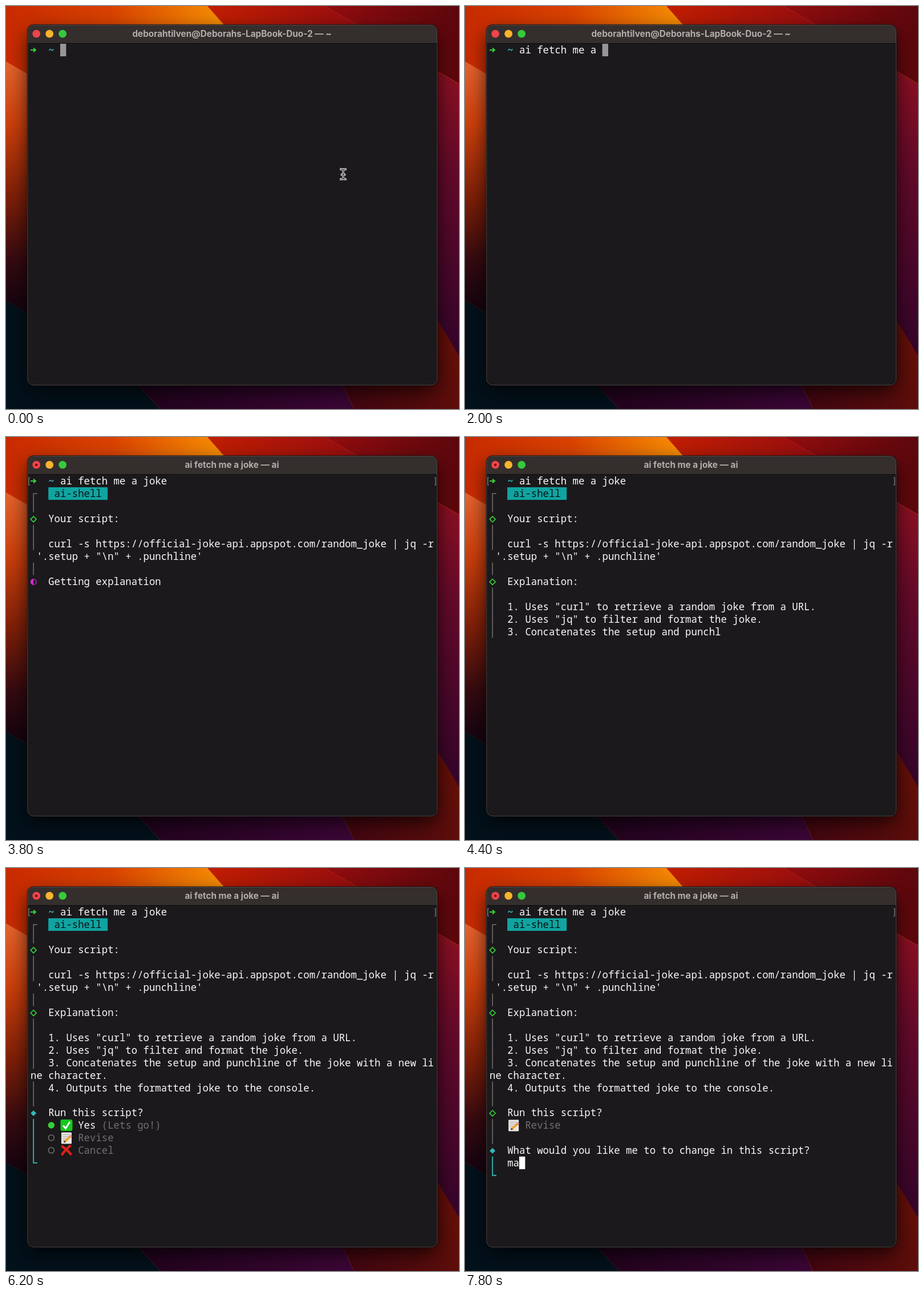
These frames come from a looping animation (794x705 px, 8000 ms). An HTML page:

```html
<!DOCTYPE html>
<html lang="en">
<head>
<meta charset="utf-8">
<title>Terminal session</title>
<style>
  html, body { margin: 0; width: 100%; height: 100%; overflow: hidden; background: #1b191b; }
  svg { display: block; width: 100%; height: 100%; }
  #screen text { font: 500 17.335px "Noto Sans Mono", "DejaVu Sans Mono", monospace; white-space: pre; }
  #screen .bold { font-weight: 900; }
  #title { font: 700 15.3px Inter, sans-serif; fill: #b3adac; text-anchor: middle; }
</style>
</head>
<body>
<svg viewBox="0 0 794 705">
  <defs>
    <linearGradient id="amber" gradientUnits="userSpaceOnUse" x1="0" x2="370">
      <stop offset="0" stop-color="#c82a00"/><stop offset=".5" stop-color="#d84200"/>
      <stop offset="1" stop-color="#f48a04"/>
    </linearGradient>
    <linearGradient id="scarlet" gradientUnits="userSpaceOnUse" x1="360" x2="610">
      <stop offset="0" stop-color="#c01d02"/><stop offset="1" stop-color="#960e0f"/>
    </linearGradient>
    <linearGradient id="maroon" gradientUnits="userSpaceOnUse" x1="560" x2="794">
      <stop offset="0" stop-color="#920d0f"/><stop offset="1" stop-color="#5c070c"/>
    </linearGradient>
    <linearGradient id="crimson" gradientUnits="userSpaceOnUse" x1="0" x2="0" y1="115" y2="600">
      <stop offset="0" stop-color="#8c1022"/><stop offset=".35" stop-color="#640a2a"/>
      <stop offset="1" stop-color="#36052b"/>
    </linearGradient>
    <linearGradient id="ember" gradientUnits="userSpaceOnUse" x1="794" x2="590" y1="590" y2="705">
      <stop offset="0" stop-color="#661008"/><stop offset="1" stop-color="#400511"/>
    </linearGradient>
    <linearGradient id="flame" gradientUnits="userSpaceOnUse" x1="0" x2="0" y1="97" y2="530">
      <stop offset="0" stop-color="#e4642e"/><stop offset=".25" stop-color="#cc400c"/>
      <stop offset=".55" stop-color="#7e1f08"/><stop offset=".8" stop-color="#360a10"/>
      <stop offset="1" stop-color="#140410"/>
    </linearGradient>
    <linearGradient id="plum" gradientUnits="userSpaceOnUse" x1="240" x2="600">
      <stop offset="0" stop-color="#22031d"/><stop offset="1" stop-color="#3c0636"/>
    </linearGradient>
    <filter id="blur" x="-20%" y="-20%" width="140%" height="140%"><feGaussianBlur stdDeviation="17"/></filter>
  </defs>

  <rect width="794" height="705" fill="url(#amber)"/>
  <path d="M558 0L794 136V620H600Z" fill="url(#crimson)"/>
  <path d="M353 0H560L618 34H383Z" fill="url(#scarlet)"/>
  <path d="M558 0H794V136Z" fill="url(#maroon)"/>
  <path d="M558 0L616 33M756 114L794 136" stroke="#c0301c" stroke-opacity=".6"/>
  <path d="M0 97L38 119V537L0 515Z" fill="url(#flame)"/>
  <path d="M0 515L38 537L232 663L270 705H0Z" fill="#03111b"/>
  <path d="M232 663L270 705H610L590 663Z" fill="url(#plum)"/>
  <path d="M700 455L794 612V705H610L590 663Z" fill="url(#ember)"/>
  <rect x="38" y="46" width="718" height="628" rx="12" opacity=".72" filter="url(#blur)"/>

  <rect x="38" y="33.5" width="717.5" height="629.5" rx="10.5" fill="#1b191b" stroke="#100c0d" stroke-width="2.5"/>
  <path d="M38 65V44A10.5 10.5 0 0 1 48.5 33.5H745A10.5 10.5 0 0 1 755.5 44V65Z" fill="#342e2d"/>
  <path d="M38 65.5H755.5" stroke="#0b0a0b"/>
  <rect x="38" y="33.5" width="717.5" height="629.5" rx="10.5" fill="none" stroke="#504a4a"/>
  <circle cx="53.2" cy="48.7" r="6.9" fill="#ee444a"/>
  <circle cx="76.2" cy="48.7" r="6.9" fill="#f7b42d"/>
  <circle cx="99.2" cy="48.7" r="6.9" fill="#35ca3c"/>
  <circle id="busy" cx="53.2" cy="48.7" r="2.3" fill="#7c0b0e"/>
  <text id="title" x="396" y="53.6"></text>
  <g id="screen"></g>
</svg>

<script>
const LOOP = 8000, STEP = 200;
const WHITE = '#fbfafb', DIM = '#716f70', RULE = '#737172', GREEN = '#35d236', CYAN = '#32b9bb';
const COMMAND = 'ai fetch me a joke';
// Characters typed at each step
const TYPED = [0, 1, 2, 4, 5, 7, 8, 9, 11, 12, 14, 16, 18];
const SCRIPT = [
  [5, 3, 'curl -s https://official-joke-api.appspot.com/random_joke | jq -r'],
  [6, 1, `'.setup + "\\n" + .punchline'`]
];
const EXPLANATION = [
  [10, 3, '1. Uses "curl" to retrieve a random joke from a URL.'],
  [11, 3, '2. Uses "jq" to filter and format the joke.'],
  [12, 3, '3. Concatenates the setup and punchline of the joke with a new li'],
  [13, 0, 'ne character.'],
  [14, 3, '4. Outputs the formatted joke to the console.']
];

const colX = col => 43 + 10.4 * col;
const rowY = row => 66 + 21.94 * row;
const midY = row => rowY(row) + 11;
const RAIL = colX(.5);

const text = (row, col, str, fill = WHITE, extra = '') =>
  `<text x="${colX(col)}" y="${rowY(row) + 17.4}" fill="${fill}" ${extra}>${str}</text>`;
const block = (row, col, cols, fill) =>
  `<rect x="${colX(col)}" y="${rowY(row)}" width="${10.4 * cols}" height="22" fill="${fill}"/>`;
const stroke = (d, color, width = 1.5) =>
  `<path d="${d}" fill="none" stroke="${color}" stroke-width="${width}"/>`;
const rail = (from, to, color = RULE) =>
  stroke(`M${RAIL} ${rowY(from)}V${rowY(to + 1)}`, color);
const railEnd = (from, row) =>
  stroke(`M${RAIL} ${rowY(from)}V${midY(row)}H55`, CYAN, 1.8);
const diamond = (row, done) =>
  `<path d="M${RAIL} ${midY(row) - 4}l5 5-5 5-5-5z" stroke-width="1.6" ` +
  (done ? `fill="none" stroke="${GREEN}"/>` : `fill="${CYAN}"/>`);
const heading = (row, str, done = true) => diamond(row, done) + text(row, 3, str);

function spinner(row, label, age) {
  const angle = [-90, 0, 90, 180][Math.floor(age / 120) % 4];
  return `<g transform="translate(${RAIL} ${midY(row) + 1}) rotate(${angle})">
    <circle r="4.8" fill="none" stroke="#d12bd3" stroke-width="1.3"/>
    <path d="M0-5A5 5 0 0 0 0 5Z" fill="#d12bd3"/></g>` + text(row, 3, label);
}

function stream(lines, progress) {
  let left = Math.round(lines.reduce((n, line) => n + line[2].length, 0) * Math.min(1, progress));
  let out = '';
  for (const [row, col, str] of lines) {
    if (left <= 0) break;
    if (col === 3) out += rail(row, row);
    out += text(row, col, str.slice(0, left));
    left -= str.length;
  }
  return out;
}

const ICONS = {
  yes: `<rect x=".5" y=".5" width="21" height="20" rx="3" fill="#14c91f"/>
    <path d="M5 11l4.5 5L17 4.5" fill="none" stroke="#fff" stroke-width="3"/>`,
  revise: `<rect x="2" y="1" width="18" height="20" rx="1" fill="#e9e7e4"/>
    <path d="M4 5h14M4 8.5h13M4 12h8M4 15.5h5" stroke="#a5a3a4"/>
    <path d="M8 17L18 8" stroke="#f2a52c" stroke-width="4"/>
    <path d="M17 9l2.5-2.3" stroke="#e5868c" stroke-width="4"/>
    <path d="M6 19l1-4 3 3z" fill="#4b3a2c"/>`,
  cancel: `<path d="M2.5 3Q12 9 19.5 18.5M18.5 2Q9 9 2.5 19" fill="none" stroke="#dd2218" stroke-width="4.2"/>`
};
const icon = (row, col, name) =>
  `<g transform="translate(${colX(col)} ${rowY(row) + .5})">${ICONS[name]}</g>`;

function option(row, name, label, selected) {
  const dot = selected ? `fill="${GREEN}"` : `fill="none" stroke="${DIM}" stroke-width="1.5"`;
  return `<circle cx="${colX(3.5)}" cy="${midY(row)}" r="${selected ? 5.7 : 5}" ${dot}/>` +
    icon(row, 5, name) + text(row, 8, label, selected ? WHITE : DIM);
}

function promptLine(str) {
  return stroke('M43 77H51M48 73.5L52 77L48 80.5', GREEN, 2) +
    text(0, 3, '~', '#35c9cf', 'class="bold"') + text(0, 5, str);
}

function mouseBeam() {
  const d = 'M587 285.5H588.5Q591 285.5 591 288V300.500Q591 303 588.5 303H587' +
    'M595 285.5H593.5Q591 285.5 591 288M591 300.500Q591 303 593.5 303H595M588.5 295H593.5';
  return `<g stroke-linecap="square">${stroke(d, '#e8e8e8', 3.4)}${stroke(d, '#151315', 1.1)}</g>`;
}

function typing(t) {
  const count = TYPED[t / STEP];
  return promptLine(COMMAND.slice(0, count)) + block(0, 5 + count, 1, '#979596') +
    (t === 0 ? mouseBeam() : '');
}

function menu(t) {
  const revise = t >= 6800;
  return heading(16, 'Run this script?', false) + railEnd(17, 20) +
    option(17, 'yes', 'Yes', !revise) + (revise ? '' : text(17, 12, '(Lets go!)', DIM)) +
    option(18, 'revise', 'Revise', revise) + option(19, 'cancel', 'Cancel', false);
}

function revision(t) {
  const answer = 'ma'.slice(0, Math.max(0, (t - 7400) / STEP));
  return heading(16, 'Run this script?') + rail(17, 18) +
    icon(17, 3, 'revise') + text(17, 6, 'Revise', DIM) +
    heading(19, 'What would you like me to to change in this script?', false) +
    railEnd(20, 21) + text(20, 3, answer) + block(20, 3 + answer.length, 1, '#fff');
}

function session(t) {
  let out = promptLine(COMMAND) +
    stroke('M42 71H40V84H42M751 71H753V84H751', '#8a8889', 1.2) +
    block(1, 3, 10, '#10a4a1') + text(1, 4, 'ai-shell', '#071314') +
    stroke(`M55 ${midY(1)}H${RAIL}V${rowY(3)}`, RULE);
  if (t < 3200) return out + spinner(3, 'Loading', t - 2600);

  out += heading(3, 'Your script:') + rail(4, 4) + stream(SCRIPT, (t - 3000) / 600);
  if (t < 3600) return out;
  out += rail(7, 7);
  if (t < 4000) return out + spinner(8, 'Getting explanation', t - 3600);

  out += heading(8, 'Explanation:') + rail(9, 9) + stream(EXPLANATION, (t - 3800) / 1000);
  if (t < 4800) return out;
  return out + rail(15, 15) + (t < 7200 ? menu(t) : revision(t));
}

const screenEl = document.getElementById('screen');
const titleEl = document.getElementById('title');
const busyEl = document.getElementById('busy');
const start = performance.now();
let shown = -1;

function draw() {
  const t = Math.floor((performance.now() - start) % LOOP / STEP) * STEP;
  if (t !== shown) {
    shown = t;
    const running = t >= 2600;
    titleEl.textContent = running ? COMMAND + ' — ai' : 'deborahtilven@Deborahs-LapBook-Duo-2 — ~';
    busyEl.setAttribute('visibility', running ? 'visible' : 'hidden');
    screenEl.innerHTML = running ? session(t) : typing(t);
  }
  requestAnimationFrame(draw);
}
draw();
</script>
</body>
</html>
```
